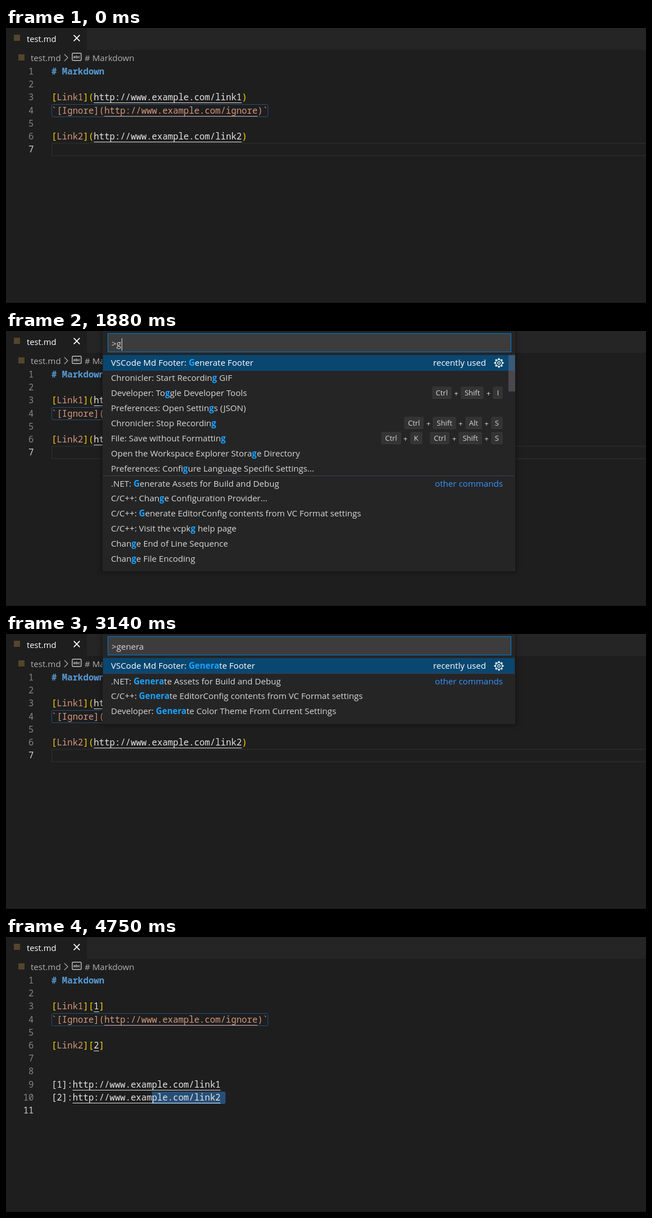
These frames come from a looping animation (1140x491 px, 5240 ms). An HTML page:

```html
<!DOCTYPE html>
<html lang="en">
<head>
<meta charset="utf-8">
<title>Markdown footer</title>
<style>
html, body { margin: 0; width: 100%; height: 100%; overflow: hidden; background: #1e1e1e; }
#stage { position: relative; width: 1140px; height: 491px; overflow: hidden; background: #1e1e1e;
  font: 15.12px "Open Sans", "Noto Sans", sans-serif; color: #d8d8d8; }
#stage div, svg { position: absolute; white-space: pre; box-sizing: border-box; }
.tabs { left: 0; top: 0; width: 100%; height: 39px; background: #252526; }
.tab { left: 0; top: 0; width: 144px; height: 39px; background: #1e1e1e; }
.name { left: 37px; top: 0; font-size: 14.8px; line-height: 38px; color: #fff; }
.crumb { top: 40px; line-height: 26px; color: #b0b0b0; }
.badge { width: 11px; height: 11px; background: #54452c; }
.edge { left: 0; top: 490px; width: 100%; height: 1px; background: #141414; }
.code, .num { font: 15.7px/23.2px "Noto Sans Mono", "DejaVu Sans Mono", monospace; color: #e4e4e4; }
.code { left: 81px; }
.num { left: 0; width: 49.5px; text-align: right; color: #858585; }
.num.on { color: #d0d0d0; }
.code b { color: #569cd6; }
.code i { font-style: normal; color: #d6977e; }
.code s { text-decoration: none; color: #ffd700; }
.code u { text-decoration: underline 1px; text-underline-offset: 4px; text-decoration-skip-ink: none; }
.code u.off { text-decoration: none; }
.now { left: 81px; top: 205px; width: 1070px; height: 24px; border: 2px solid #282828; }
.span { left: 81px; top: 136px; width: 386px; height: 23px; border: 1px solid #264f78; border-radius: 3px; }
.sel { left: 260px; top: 276px; width: 131px; height: 22px; background: #264f78; border-radius: 0 3px 3px 0; }
.caret { left: 81px; width: 2px; height: 24px; background: #aeafad; }
.palette { left: 172px; top: -4px; width: 735px; background: #252526; box-shadow: 0 0 8px 2px rgba(0,0,0,.36); }
.input { left: 9px; top: 8px; width: 719px; height: 34px; border: 1px solid #007fd4; background: #3c3c3c;
  line-height: 34px; padding-left: 6px; }
.input span { display: inline-block; height: 22px; width: 1px; margin-left: 1px; background: #ddd; vertical-align: middle; }
.row { left: 1px; width: 733px; height: 27.5px; line-height: 26.88px; padding-left: 14px; }
.row.first { background: #094771; color: #fff; }
.row.split { border-top: 1px solid #3f3f46; }
.row b { color: #18a3ff; }
.row .side { top: 0; right: 21px; }
.row.first .side { right: 51px; }
.split .side { color: #3794ff; }
.keys { top: 2px; right: 21px; height: 22px; display: flex; font-size: 13px; line-height: 20px; }
.keys kbd { font: inherit; padding: 0 6px; border: 1px solid rgba(51,51,51,.6); border-bottom-color: rgba(68,68,68,.6);
  border-radius: 3px; background: rgba(128,128,128,.17); }
.keys span { width: 16px; text-align: center; line-height: 24px; }
.keys em { width: 13.5px; }
.thumb { right: 0; top: 47px; width: 12px; height: 65px; background: rgba(125,117,137,.42); }
</style>
</head>
<body>
<div id="stage"></div>
<script>
const LOOP = 5240, LINE = 23.2, ROW = 26.88;

const recent = [
  ['VSCode Md Footer: Generate Footer'],
  ['Chronicler: Start Recording GIF'],
  ['Developer: Toggle Developer Tools', 'Ctrl Shift I'],
  ['Preferences: Open Settings (JSON)'],
  ['Add Browser Breakpoint'],
  ['Developer: Reload Window', 'Ctrl R'],
  ['Add Selection To Previous Find Match'],
  ['Search: Find in Files', 'Ctrl Shift F'],
  ['Chronicler: Stop Recording', 'Ctrl Shift Alt S'],
  ['File: Save without Formatting', 'Ctrl K,Ctrl Shift S'],
  ['Developer: Reload Webviews'],
  ['Preferences: Open Default Keyboard Shortcuts (JSON)'],
  ['Preferences: Open Keyboard Shortcuts (JSON)'],
  ['Preferences: Open Keyboard Shortcuts', 'Ctrl K,Ctrl S'],
  ['Open the Workspace Explorer Storage Directory'],
  ['Preferences: Configure Language Specific Settings...']
];
const others = [
  ['.NET: Generate Assets for Build and Debug'],
  ['C/C++: Change Configuration Provider...'],
  ['C/C++: Generate EditorConfig contents from VC Format settings'],
  ['C/C++: Visit the vcpkg help page'],
  ['Change End of Line Sequence'],
  ['Change File Encoding'],
  ['Change Folder Icon'],
  ['Change Language Mode', 'Ctrl K,M'],
  ['Change Workspace Icon'],
  ['Configure Display Language'],
  ['Debug: Download .NET Core Debugger'],
  ['Developer: Generate Color Theme From Current Settings']
];

// Each step lists only what changes from the one before it.
const steps = [
  [0, { caret: false, query: null, typing: true, done: false, dirty: false, fresh: false, ignoreLink: true, refLinks: false }],
  [390, { caret: true }],
  [880, { caret: false }],
  [1410, { caret: true }],
  [1540, { caret: false, query: '' }],
  [1880, { query: 'g' }],
  [2080, { query: 'ge' }],
  [2150, { query: 'gen' }],
  [2280, { query: 'gene' }],
  [2480, { query: 'gener' }],
  [2610, { query: 'genera' }],
  [3140, { typing: false }],
  [3210, { query: null }],
  [3290, { done: true, dirty: true, fresh: true, caret: true }],
  [3480, { fresh: false, ignoreLink: false }],
  [3750, { caret: false }],
  [4210, { caret: true, dirty: false }],
  [4280, { ignoreLink: true, refLinks: true }],
  [4750, { caret: false }]
];

const box = (cls, html = '', style = '') => `<div class="${cls}" style="${style}">${html}</div>`;
const link = (text, on = true) => `<u class="${on ? '' : 'off'}">${text}</u>`;
const url = name => 'http://www.example.com/' + name;

function docLines(s) {
  const br = c => s.fresh ? c : `<s>${c}</s>`;
  const label = n => `${br('[')}<i>Link${n}</i>${br(']')}`;
  const item = n => label(n) + (s.done
    ? br('[') + link(n, s.refLinks) + br(']')
    : br('(') + link(url('link' + n)) + br(')'));
  const lines = ['<b># Markdown</b>', '', item(1),
    '<i>`[Ignore](' + link(url('ignore'), s.ignoreLink) + ')`</i>', '', item(2), ''];
  if (s.done) {
    const foot = n => `[${n}]:` + link(url('link' + n), !s.fresh);
    lines.push('', foot(1), foot(2), '');
  }
  return lines;
}

function editor(s) {
  const lines = docLines(s);
  let html = box('span') + box(s.done ? 'sel' : 'now');
  lines.forEach((text, i) => {
    const top = `top:${65.9 + i * LINE}px`;
    html += box('num' + (i === lines.length - 1 ? ' on' : ''), i + 1, top) + box('code', text, top);
  });
  if (s.caret) html += box('caret', '', `top:${s.done ? 298 : 205}px`);
  return html;
}

function header(s) {
  const mark = s.dirty
    ? '<circle cx="126" cy="18" r="5.5" fill="#fff"/>'
    : '<path d="M120.7 12.7l10.6 10.6m0-10.6l-10.6 10.6" stroke="#fff" stroke-width="1.7"/>';
  return box('tabs') + box('tab') + box('badge', '', 'left:14px;top:12px') + box('name', 'test.md') +
    box('badge', '', 'left:22px;top:47px') +
    box('crumb', 'test.md', 'left:44px') + box('crumb', '# Markdown', 'left:140px') +
    `<svg width="240" height="66" style="left:0;top:0" fill="none">${mark}
      <path d="M104 47l6 6-6 6" stroke="#a9a9a9" stroke-width="1.3"/>
      <rect x="118" y="45" width="16" height="13" rx="1.5" stroke="#c5c5c5" stroke-width="1.4"/>
      <text x="126" y="53.5" text-anchor="middle" font-size="7" font-weight="700" fill="#c5c5c5">abc</text></svg>`;
}

const gear = `<svg width="20" height="20" viewBox="-10 -10 20 20" style="left:695px;top:4px" fill="none" stroke="#fff">
  <circle r="7.3" stroke-width="2.2" pathLength="16" stroke-dasharray="1 1" stroke-dashoffset=".5"/>
  <circle r="5.9" stroke-width="1.2"/><circle r="2.3" stroke-width="1.2"/></svg>`;

function mark(text, q) {
  const i = text.toLowerCase().indexOf(q), j = i + q.length;
  return q ? `${text.slice(0, i)}<b>${text.slice(i, j)}</b>${text.slice(j)}` : text;
}

const keys = combo => box('keys', combo.split(',').map(chord =>
  chord.split(' ').map(k => `<kbd>${k}</kbd>`).join('<span>+</span>')).join('<em></em>'));

function palette({ query: q, typing }) {
  const hit = ([text]) => text.toLowerCase().includes(q);
  const used = recent.filter(hit), all = used.concat(others.filter(hit)), rows = all.slice(0, 14);
  let html = box('input', '&gt;' + q + (typing ? '<span></span>' : ''));
  rows.forEach(([text, combo], i) => {
    const first = i === 0, split = i === used.length;
    let inner = mark(text, q);
    if (first) inner += box('side', 'recently used') + gear;
    if (split) inner += box('side', 'other commands');
    if (combo) inner += keys(combo);
    html += box('row' + (first ? ' first' : split ? ' split' : ''), inner, `top:${47.4 + i * ROW}px`);
  });
  if (q && all.length > rows.length) html += box('thumb');
  return box('palette', html, `height:${57 + rows.length * ROW}px`);
}

const scenes = [];
let state = {};
for (const [at, change] of steps) {
  state = { ...state, ...change };
  const html = header(state) + editor(state) + box('edge') + (state.query === null ? '' : palette(state));
  scenes.push({ at, html });
}

const stage = document.getElementById('stage');
const start = performance.now();
let shown = null;
function tick() {
  const t = Math.max(0, performance.now() - start) % LOOP;
  const scene = scenes.findLast(s => s.at <= t);
  if (scene !== shown) {
    stage.innerHTML = scene.html;
    shown = scene;
  }
  requestAnimationFrame(tick);
}
tick();
</script>
</body>
</html>
```
